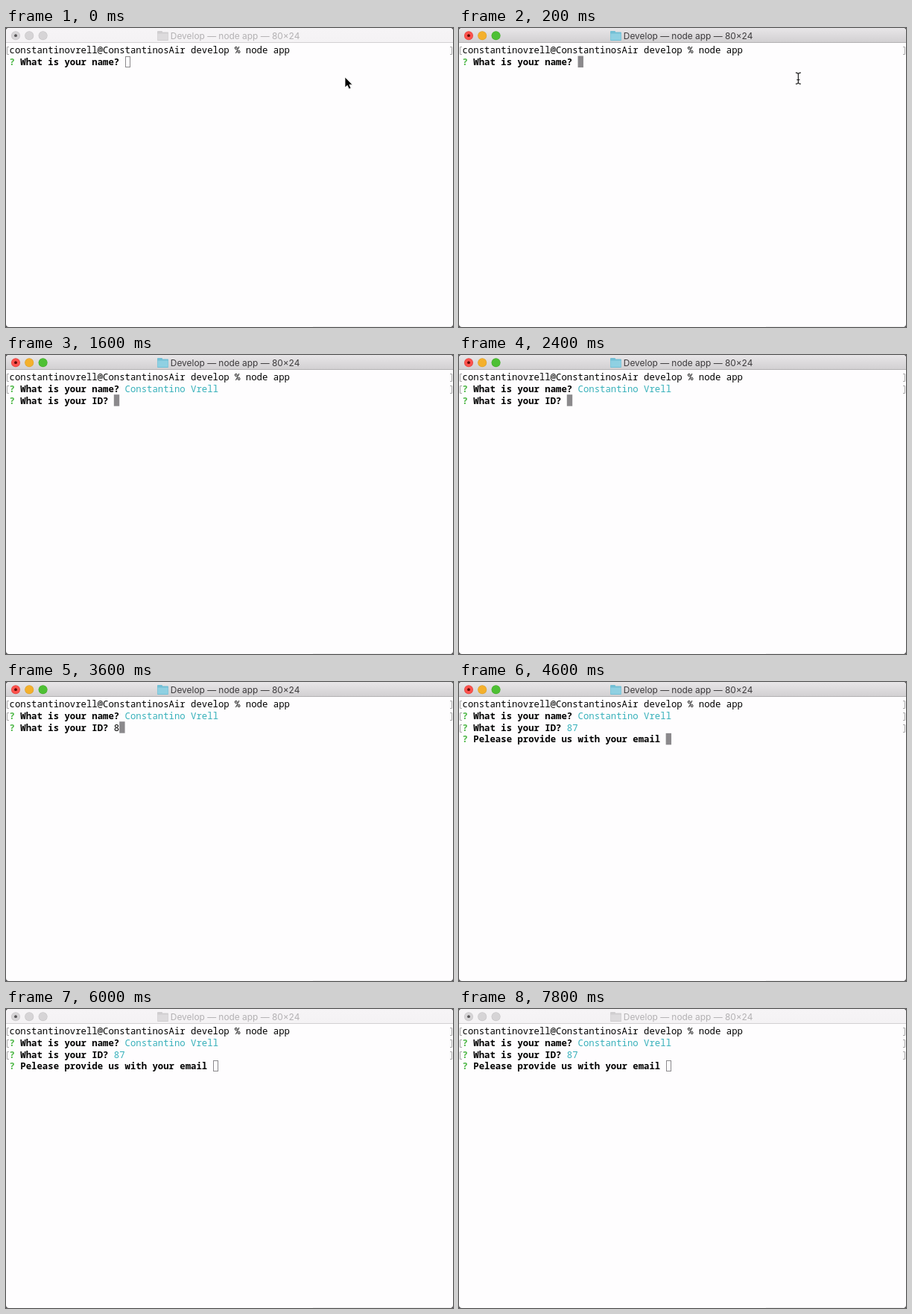
Recreate the animation shown at these times as an HTML page with a canvas. Size 600 px wide and 402 px high, loop 8000 ms.

```html
<!DOCTYPE html>
<html lang="en">
<head>
<meta charset="utf-8">
<title>Terminal prompt</title>
<style>
  html, body { margin: 0; width: 100%; height: 100%; overflow: hidden; background: #fefdfe; }
  canvas { display: block; width: 600px; height: 402px; }
</style>
</head>
<body>
<canvas id="stage" width="600" height="402"></canvas>
<script>
const ctx = document.getElementById('stage').getContext('2d');
const W = 600, H = 402, LOOP = 8000, TICK = 200;
const LEFT = 4.6, PITCH = 7.38, TOP = 22.2, LINE = 15.65;
const MONO = '12.3px "Noto Sans Mono", "DejaVu Sans Mono", monospace';
const TITLE_FONT = '11.9px Inter, "Liberation Sans", sans-serif';
const INK = '#000', GREEN = '#4fb848', CYAN = '#36b0ba';

const NAME = 'Constantino Vrell';
const COMMAND = 'constantinovrell@ConstantinosAir develop % node app';

// Moments of change, in ms.
const FOCUS = 200, TYPE_NAME = 400, NAME_DONE = 800, ENTER_NAME = 1600;
const TYPE_ID = 3200, ID_DONE = 3800, ENTER_ID = 4200, BLUR = 5400;

const colX = col => LEFT + col * PITCH;
const rowY = row => TOP + row * LINE;

function text(str, col, row, color, bold) {
  ctx.font = `${bold ? 700 : 500} ${MONO}`;
  ctx.fillStyle = color;
  ctx.fillText(str, colX(col), Math.round(rowY(row) + 12.05));
}

function disc(x, y, r, color) {
  ctx.fillStyle = color;
  ctx.beginPath();
  ctx.arc(x, y, r, 0, Math.PI * 2);
  ctx.fill();
}

function shape(points, fill) {
  ctx.beginPath();
  points.forEach(([x, y]) => ctx.lineTo(x, y));
  ctx.closePath();
  ctx.fillStyle = fill;
  ctx.fill();
}

function brackets(row) {
  const y = Math.round(rowY(row)) + 3.5;
  ctx.strokeStyle = '#a8a7a8';
  ctx.lineWidth = 1;
  for (const [spine, tip] of [[1.5, 4], [598.5, 596]]) {
    ctx.beginPath();
    ctx.moveTo(tip, y);
    ctx.lineTo(spine, y);
    ctx.lineTo(spine, y + 10);
    ctx.lineTo(tip, y + 10);
    ctx.stroke();
  }
}

function caret(col, row, active) {
  const x = colX(col), y = rowY(row) - 0.3;
  if (active) {
    ctx.fillStyle = '#8b898c';
    ctx.fillRect(x, y, PITCH, 15.5);
  } else {
    ctx.strokeStyle = '#8b898c';
    ctx.lineWidth = 1;
    ctx.strokeRect(Math.round(x) + 0.5, Math.round(y) + 0.5, 6, 14);
  }
}

function folder(active) {
  ctx.fillStyle = active ? '#72bfd5' : '#d0ced0';
  ctx.beginPath();
  ctx.roundRect(203, 4, 7, 5, 1);
  ctx.roundRect(203, 5.5, 15, 11.5, 1);
  ctx.fill();
  ctx.fillStyle = active ? '#8fd0e2' : '#dddbdd';
  ctx.fillRect(203.5, 7.5, 14, 8.5);
}

function titleBar(active) {
  const shade = ctx.createLinearGradient(0, 0, 0, 20);
  shade.addColorStop(0, active ? '#e8e6e8' : '#f6f4f6');
  shade.addColorStop(1, active ? '#d1cfd1' : '#f4f2f4');
  ctx.fillStyle = shade;
  ctx.fillRect(0, 0, W, 20);
  ctx.fillStyle = active ? '#b3b1b3' : '#d2d0d2';
  ctx.fillRect(0, 19, W, 1);

  const fills = active ? ['#fc524d', '#f4b02c', '#4ec034'] : Array(3).fill('#d6d4d6');
  const rims = active ? ['#e2443f', '#dba02c', '#43ad2c'] : Array(3).fill('#c6c4c6');
  [13, 31.2, 49.6].forEach((x, i) => {
    disc(x, 10.2, 6, rims[i]);
    disc(x, 10.2, 5.4, fills[i]);
  });
  disc(13, 10.2, 1.9, active ? '#5e0805' : '#555355');

  folder(active);
  ctx.font = TITLE_FONT;
  ctx.fillStyle = active ? '#3c3a3c' : '#b3b1b3';
  ctx.textAlign = 'center';
  ctx.fillText('Develop — node app — 80×24', 307.6, 14.8);
  ctx.textAlign = 'left';
}

function question(row, prompt, answer, done, current, active) {
  text('?', 0, row, GREEN, true);
  text(prompt, 2, row, INK, true);
  const start = prompt.length + 3;
  text(answer, start, row, done ? CYAN : INK);
  if (done) brackets(row);
  if (current) caret(start + answer.length, row, active);
}

function arrow(x, y) {
  const outline = [[0, 0], [0, 14], [3.2, 11.2], [5.4, 16], [8, 14.9], [5.9, 10.2], [10, 10.2]];
  const points = outline.map(([dx, dy]) => [x + dx, y + dy]);
  shape(points, '#000');
  ctx.strokeStyle = '#fff';
  ctx.lineWidth = 0.8;
  ctx.stroke();
}

function iBeam(x, y) {
  ctx.strokeStyle = '#222';
  ctx.lineWidth = 1.2;
  ctx.beginPath();
  for (const side of [-1, 1]) {
    ctx.moveTo(x + side * 3.5, y);
    ctx.quadraticCurveTo(x, y, x, y + 2.5);
    ctx.lineTo(x, y + 12.5);
    ctx.quadraticCurveTo(x, y + 15, x + side * 3.5, y + 15);
  }
  ctx.moveTo(x - 2, y + 9.5);
  ctx.lineTo(x + 2, y + 9.5);
  ctx.stroke();
}

function typedName(t) {
  if (t < TYPE_NAME) return '';
  const share = (t - TYPE_NAME + TICK) / (NAME_DONE - TYPE_NAME + TICK);
  return NAME.slice(0, Math.round(NAME.length * Math.min(1, share)));
}

function draw(t) {
  const active = t >= FOCUS && t < BLUR;
  const named = t >= ENTER_NAME, identified = t >= ENTER_ID;

  ctx.fillStyle = '#4a484a';
  ctx.fillRect(0, 0, W, H);
  ctx.save();
  ctx.beginPath();
  ctx.roundRect(0, 0, W, H, 4);
  ctx.clip();
  ctx.fillStyle = '#fefdfe';
  ctx.fillRect(0, 0, W, H);
  ctx.fillStyle = '#f1f0f1';
  ctx.fillRect(412, H - 1, 184, 1);
  titleBar(active);
  ctx.restore();

  text(COMMAND, 0, 0, INK);
  brackets(0);
  question(1, 'What is your name?', typedName(t), named, !named, active);
  if (named) {
    const id = t < TYPE_ID ? '' : t < ID_DONE ? '8' : '87';
    question(2, 'What is your ID?', id, identified, !identified, active);
  }
  if (identified) {
    question(3, 'Pelease provide us with your email', '', false, true, active);
  }

  if (t < FOCUS) arrow(455, 66);
  else if (!named) iBeam(455.4, 60.2);
}

function frame(now) {
  const t = now % LOOP;
  draw(t - t % TICK);
  requestAnimationFrame(frame);
}
requestAnimationFrame(frame);
</script>
</body>
</html>
```
